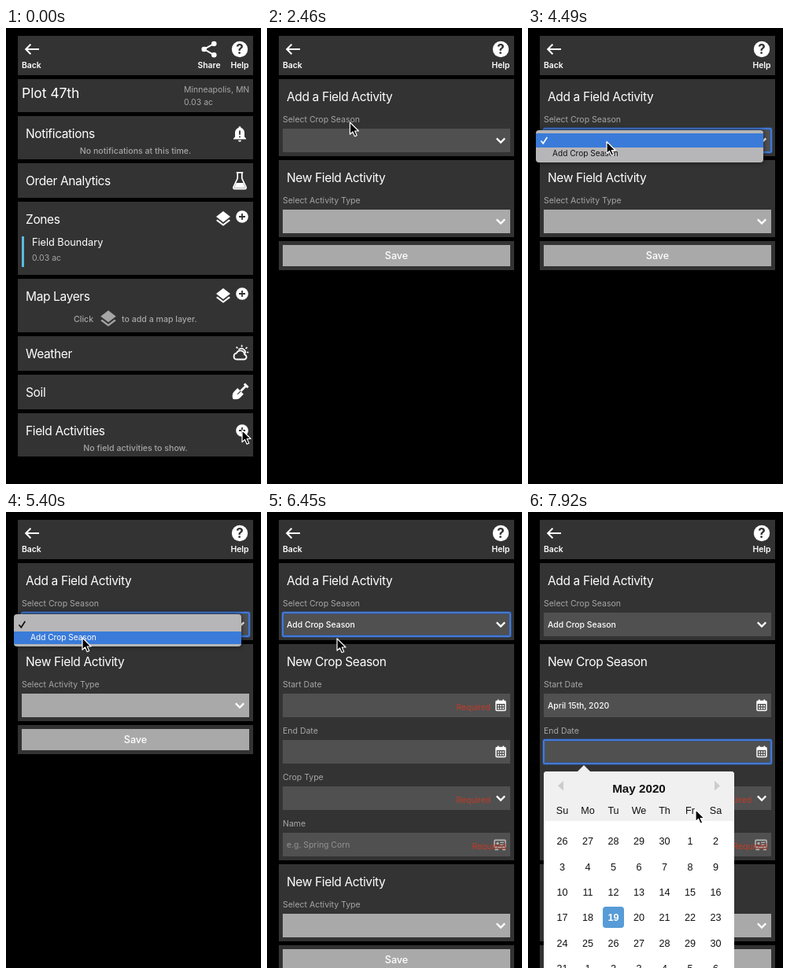
These frames come from a looping animation (324 px wide and 580 px high, 7990 ms). An HTML page:

```html
<!DOCTYPE html>
<html lang="en">
<head>
<meta charset="utf-8">
<title>Field activity</title>
<style>
  html, body { margin: 0; width: 100%; height: 100%; overflow: hidden; background: #000; }
  svg { display: block; width: 100%; height: 100%; }
  text { font-family: Inter, "Open Sans", sans-serif; fill: #fff; white-space: pre; }
  .title { font-size: 15.5px; letter-spacing: -.36px; }
  .place { font-size: 17.6px; letter-spacing: -.1px; }
  .sub { font-size: 12.7px; }
  .label { font-size: 10.5px; fill: #a6a6a6; }
  .note { font-size: 10.6px; font-weight: 500; fill: #a6a6a6; }
  .nav { font-size: 10.4px; font-weight: 600; }
  .value { font-size: 10.4px; font-weight: 500; }
  .hint { font-size: 10.4px; fill: #929292; }
  .need { font-size: 10.3px; fill: #c53a26; }
  .save { font-size: 12.6px; font-weight: 500; }
  .item { font-size: 10.1px; }
  .mark { font-size: 17px; font-weight: 700; fill: #333; }
  .day { font-family: "Liberation Sans", Arial, sans-serif; font-size: 12.6px; fill: #111; }
  .month { font-family: "Liberation Sans", Arial, sans-serif; font-size: 15.2px; font-weight: 700; fill: #111; }
  .picked { fill: #fff; font-weight: 700; }
</style>
</head>
<body>
<svg id="stage" viewBox="0 0 324 580" xmlns="http://www.w3.org/2000/svg"></svg>
<script>
const LOOP = 7990;
const GREY = '#333', FIELD = '#505050', LIGHT = '#a9a9a9';

// Drawing helpers
const rect = (x, y, w, h, fill, more = '') =>
  `<rect x="${x}" y="${y}" width="${w}" height="${h}" fill="${fill}" ${more}/>`;
const text = (x, y, cls, str, anchor = 'start') =>
  `<text x="${x}" y="${y}" class="${cls}" text-anchor="${anchor}">${str}</text>`;
const line = (d, color = '#fff', w = 2, more = '') =>
  `<path d="${d}" fill="none" stroke="${color}" stroke-width="${w}" ${more}/>`;
const shape = (d, fill = '#fff') => `<path d="${d}" fill="${fill}"/>`;
const disc = (x, y, r, fill = '#fff') => `<circle cx="${x}" cy="${y}" r="${r}" fill="${fill}"/>`;
const at = (x, y, body, scale = 1) => `<g transform="translate(${x} ${y}) scale(${scale})">${body}</g>`;
const group = (id, body) => `<g id="${id}">${body}</g>`;
const panel = (y, bottom) => rect(15, y, 299, bottom - y, GREY);
const field = (y, fill = FIELD, h = 30) => rect(20, y, 289, h, fill);
const ring = (id, y) => group(id,
  rect(20, y, 289, 30, 'none', 'rx="2" stroke="#2f5699" stroke-width="4" opacity=".55"') +
  rect(20, y, 289, 30, 'none', 'rx="1.5" stroke="#4379d3" stroke-width="2"'));

// Icons, centred on 0,0
const chevron = y => line(`M291.8 ${y - 2.6}l5.2 5.2 5.2-5.2`, '#fff', 2.2);
const layers = (x, y, fill = '#fff', scale = 1) => at(x, y,
  shape('M0-9L9-2 0 4.9-9-2Z', fill) + shape('M-7.3 1.6L0 7.2 7.3 1.6 9 2.9 0 9.8-9 2.9Z', fill), scale);
const plus = (x, y) => at(x, y, disc(0, 0, 7.8) + line('M-4 0H4M0-4V4', GREY, 1.8));
const bell = at(297, 135,
  shape('M-8 6.6V5.4L-6-3.4+0z'.replace('L-6-3.4+0z', 'L-6 3.4V-2C-6-5-4.2-7.3-1.5-8V-8.6A1.5 1.5 0 0 1 1.5-8.6V-8C4.2-7.3 6-5 6-2V3.4L8 5.4V6.6Z')) +
  shape('M-2 7.7H2A2 2 0 0 1-2 7.7Z') + line('M0-4.6V.8M0 2.4V4.2', GREY, 1.8));
const flask = at(297, 194,
  line('M-4.2-10.2H4.2M-2.8-10V-2.6L-8 8.2Q-8.6 10.6-6.4 10.6H6.4Q8.6 10.6 8 8.2L2.8-2.6V-10', '#fff', 1.7) +
  shape('M-4.4 3H4.4L7.4 9.6H-7.4Z'));
const weather = at(297, 413,
  line('M-4.5 8.5A4 4 0 0 1-4.2 .7 5.3 5.3 0 0 1 6 2.3 3.2 3.2 0 0 1 6.2 8.5Z', '#fff', 1.8, 'stroke-linejoin="round"') +
  line('M-1.5-3.6A5 5 0 0 1 7 1', '#fff', 1.7) +
  line('M2.6-9.8V-7.2M-4.4-7.3l1.8 1.8M9.4-7l-1.8 1.8M8.9-.5h2.4', '#fff', 1.7));
const shovel = at(297, 463,
  `<g transform="rotate(45)">${line('M-3.3-11.5H3.3', '#fff', 3)}${line('M0-11V1', '#fff', 2.8)}` +
  `${shape('M-5.4-1.5H5.4V5.5Q5 9.5 0 12.5-5 9.5-5.4 5.5Z')}${line('M0-2V4', GREY, 1.2)}</g>`);
const dateIcon = y => at(297, y,
  rect(-6, -5.4, 12, 12, 'none', 'rx="1" stroke="#fff" stroke-width="1.5"') +
  rect(-6, -5.4, 12, 3.4, '#fff') + line('M-3.3-7.6V-4M3.3-7.6V-4', '#fff', 1.7) +
  line('M-3.9 .4H4M-3.9 3.6H4', '#fff', 1.9, 'stroke-dasharray="1.9 1.1"'));
const cardIcon = at(296, 423,
  rect(-7, -5.6, 14, 9, 'none', 'rx="1" stroke="#b4b4b4" stroke-width="1.6"') +
  disc(-3, -1.6, 1.7, '#b4b4b4') + line('M0-2.6H5M0 .2H5', '#b4b4b4', 1.3) +
  line('M-6.5 6.4H-2M3 6.4H7', '#b4b4b4', 1.8));

const header = panel(10, 60) +
  line('M42 27H25.5M31.4 20.8L25.2 27l6.2 6.2') + text(20, 51, 'nav', 'Back') +
  disc(297, 27, 10.2) + text(297, 33.2, 'mark', '?', 'middle') + text(297, 51, 'nav', 'Help', 'middle');

const home = line('M264.5 19.8L251.5 27l13 7.3') +
  disc(264.3, 20, 3.3) + disc(251.7, 27, 3.3) + disc(264.3, 34.2, 3.3) +
  text(258, 51, 'nav', 'Share', 'middle') +
  panel(65, 107) + text(20, 89, 'place', 'Plot 47th') +
  text(226, 82, 'label', 'Minneapolis, MN') + text(226, 98, 'label', '0.03 ac') +
  panel(112, 167) + text(25, 140, 'title', 'Notifications') + bell +
  text(164.5, 160, 'note', 'No notifications at this time.', 'middle') +
  panel(172, 216) + text(25, 200, 'title', 'Order Analytics') + flask +
  panel(221, 314) + text(25, 249, 'title', 'Zones') + layers(276, 242) + plus(300, 240) +
  rect(20, 265, 3, 39, '#5bbbe0') + text(33, 277, 'sub', 'Field Boundary') + text(33, 296, 'label', '0.03 ac') +
  panel(319, 387) + text(25, 347, 'title', 'Map Layers') + layers(276, 340) + plus(300, 338) +
  text(86, 374, 'note', 'Click') + layers(130, 369, '#a6a6a6', 1.08) + text(147, 374, 'note', 'to add a map layer.') +
  panel(392, 436) + text(25, 420, 'title', 'Weather') + weather +
  panel(441, 485) + text(25, 469, 'title', 'Soil') + shovel +
  panel(490, 545) + text(25, 518, 'title', 'Field Activities') + plus(300, 512) +
  text(164.5, 538, 'note', 'No field activities to show.', 'middle');

const season = panel(65, 163) + text(25, 93, 'title', 'Add a Field Activity') +
  text(20, 120, 'label', 'Select Crop Season') + field(128) + chevron(143) +
  group('chosen', text(25, 147, 'value', 'Add Crop Season')) + ring('seasonRing', 128);

const activity = dy => at(0, dy,
  panel(168, 266) + text(25, 196, 'title', 'New Field Activity') +
  text(20, 223, 'label', 'Select Activity Type') + field(231, LIGHT) + chevron(246) +
  panel(271, 308) + field(276, LIGHT, 27) + text(164.5, 294, 'save', 'Save', 'middle'));

const details = panel(168, 443) + text(25, 196, 'title', 'New Crop Season') +
  ['Start Date', 'End Date', 'Crop Type', 'Name'].map((name, i) =>
    text(20, 223 + 59 * i, 'label', name) + field(231 + 59 * i)).join('') +
  dateIcon(246) + dateIcon(305) + chevron(364) + cardIcon +
  group('startNeed', text(284, 252, 'need', 'Required', 'end')) +
  group('startValue', text(25, 250, 'value', 'April 15th, 2020')) +
  text(284, 370, 'need', 'Required', 'end') +
  text(25, 427, 'hint', 'e.g. Spring Corn') + text(304, 429, 'need', 'Required', 'end') +
  ring('endRing', 290) + activity(280);

const menu = rect(10, 130, 289, 41, '#000', 'rx="4" filter="url(#soft)" opacity=".6"') +
  rect(10, 130, 289, 41, '#b6b6b8', 'rx="4"') +
  `<rect id="bar" x="10" width="289" fill="#3a7bd9"/>` +
  `<path id="tick" d="M16.5 143.5l2.8 3.3 5-7.8" fill="none" stroke-width="1.7"/>` +
  `<text id="option" x="31" y="163" class="item">Add Crop Season</text>`;

function calendar() {
  const colX = i => 43.5 + 32.5 * i;
  let out = shape('M62 331L71 322 80 331Z', '#f0f0f0') + rect(20, 330, 242, 260, '#fff', 'rx="4"') +
    shape('M20 393V334Q20 330 24 330H258Q262 330 262 334V393Z', '#f0f0f0') +
    shape('M45 342V354.5L38 348.2Z', '#ccc') + shape('M237 342V354.5L244 348.2Z', '#ccc') +
    text(141, 357, 'month', 'May 2020', 'middle');
  ['Su', 'Mo', 'Tu', 'We', 'Th', 'Fr', 'Sa'].forEach((d, i) => out += text(colX(i), 384, 'day', d, 'middle'));
  for (let i = 0; i < 42; i++) {
    const n = i < 5 ? 26 + i : (i - 5) % 31 + 1;
    const x = colX(i % 7), y = 419 + 32.3 * Math.floor(i / 7);
    const picked = i === 23;
    if (picked) out += rect(x - 13.5, y - 14, 27, 27, '#579bd7', 'rx="4"');
    out += text(x, y + 4.3, picked ? 'day picked' : 'day', n, 'middle');
  }
  return out;
}

const arrow = '<path d="M0 0V15.2L3.5 12 6.1 17.8 8.7 16.6 6.2 11H11Z" fill="#000" stroke="#fff" stroke-width="1.2" stroke-linejoin="round"/>';
const beamPath = 'M-3-8Q0-8 0-6 0-8 3-8M0-6V7M-3 9Q0 9 0 7 0 9 3 9M-2 2.5H2';
const beam = line(beamPath, '#fff', 3) + line(beamPath, '#111', 1.1);

document.getElementById('stage').innerHTML =
  '<defs><filter id="soft" x="-10%" y="-50%" width="120%" height="200%"><feGaussianBlur stdDeviation="3"/></filter></defs>' +
  rect(0, 0, 324, 580, '#000') + header + group('home', home) +
  group('form', season + group('brief', activity(0)) + group('details', details)) +
  group('menu', menu) + group('calendar', calendar()) +
  group('cursor', group('arrow', arrow) + group('beam', beam));

const el = {};
document.querySelectorAll('#stage [id]').forEach(n => el[n.id] = n);
const show = (id, on) => el[id].setAttribute('display', on ? 'inline' : 'none');

// Pointer stops: time, x, y
const stops = [
  [0, 300, 511.5], [1970, 300, 511.5], [2390, 108, 106], [2600, 98, 160], [2670, 98, 160],
  [3000, 97.5, 161], [3370, 100, 152.5], [3510, 100, 146], [3860, 100, 144.5], [4490, 100, 144.5],
  [5120, 97, 160], [5750, 97, 160], [6170, 89, 161], [6730, 89, 161], [7360, 78, 247.5],
  [7430, 78, 247.5], [7500, 150, 312], [7570, 150, 312], [7920, 213, 378.5], [LOOP, 213, 378.5]
];

function pointer(t) {
  const i = Math.max(1, stops.findIndex(s => s[0] >= t));
  const [t0, x0, y0] = stops[i - 1], [t1, x1, y1] = stops[i];
  const p = (t - t0) / (t1 - t0), e = p * p * (3 - 2 * p);
  return [x0 + (x1 - x0) * e, y0 + (y1 - y0) * e];
}

function draw(time) {
  const t = time < 2040 ? time : 2040 + Math.floor((time - 2040) / 70) * 70;
  const [x, y] = pointer(t);
  const onForm = t >= 1270, added = t >= 6450, dated = t >= 7500;
  const menuOpen = t >= 3580 && t < 6450;
  const typing = added && !dated && y > 231 && y < 261;

  show('home', !onForm);
  show('form', onForm);
  show('brief', !added);
  show('details', added);
  show('chosen', added);
  show('seasonRing', t >= 3580 && !dated);
  show('startNeed', !dated);
  show('startValue', dated);
  show('endRing', dated);
  show('calendar', dated);

  show('menu', menuOpen);
  el.menu.setAttribute('opacity', t >= 6380 ? .5 : 1);
  const second = y > 152 && t > 4490;
  const lit = !(t >= 6240 && t < 6310);
  el.bar.setAttribute('y', second ? 152 : 134);
  el.bar.setAttribute('height', second ? 16 : 18);
  show('bar', lit);
  el.tick.setAttribute('stroke', second ? '#111' : '#fff');
  el.option.style.fill = second && lit ? '#fff' : '#111';

  el.cursor.setAttribute('transform', `translate(${x.toFixed(2)} ${y.toFixed(2)})`);
  show('arrow', !typing);
  show('beam', typing);
}

const start = performance.now();
function tick() {
  draw((performance.now() - start) % LOOP);
  requestAnimationFrame(tick);
}
tick();
</script>
</body>
</html>
```
